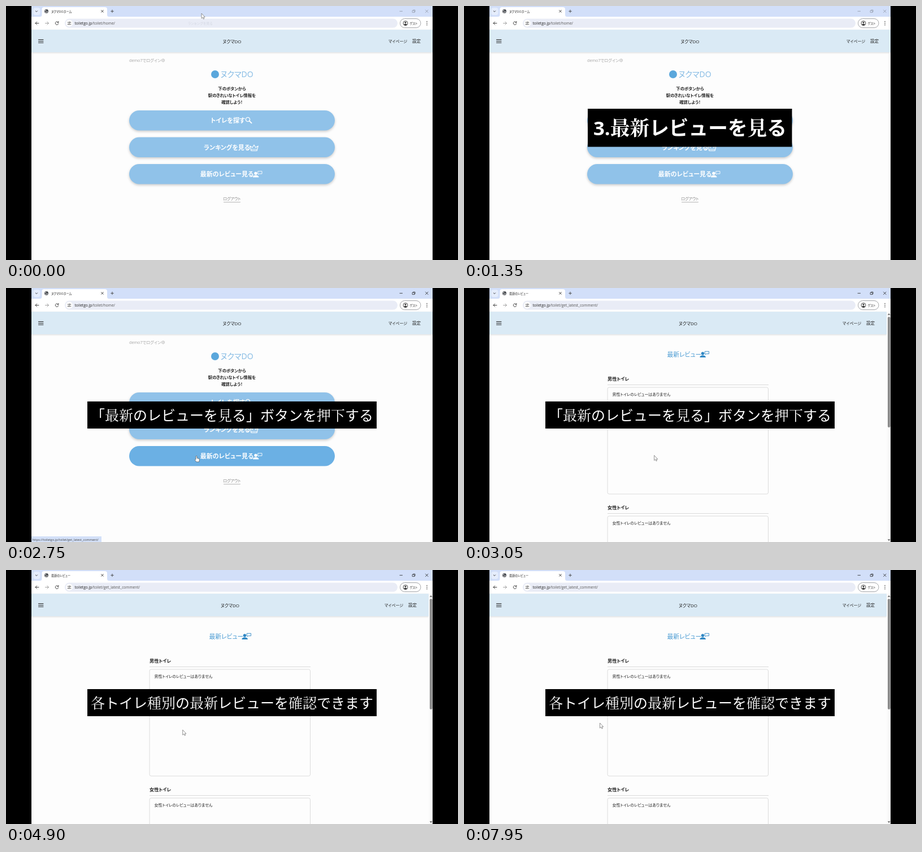
An HTML page for the animation above (8 s loop, 800 px wide and 450 px high).

```html
<!DOCTYPE html>
<html lang="ja">
<head>
<meta charset="utf-8">
<title>操作ガイド</title>
<style>
  html, body { margin: 0; width: 100%; height: 100%; overflow: hidden; background: #000; }
  svg { display: block; width: 100%; height: 100%; }
  text { font-family: "Open Sans", "Noto Sans CJK JP", "Noto Sans CJK", sans-serif; font-feature-settings: "palt"; white-space: pre; }
  .caption text { font-family: "Noto Sans", "Noto Sans CJK JP", "Noto Sans CJK", sans-serif; font-feature-settings: normal; fill: #fff; }
  .kanji { font-family: "Noto Serif CJK JP", "Noto Sans CJK JP", "Noto Sans CJK", serif; }
  .line { fill: none; stroke-linecap: round; stroke-linejoin: round; }
  .button rect { fill: #90c2e9; filter: drop-shadow(0 2px 2px #0003); }
  .button.hover rect { fill: #6bb0e4; filter: none; }
</style>
</head>
<body>
<svg id="stage" viewBox="0 0 800 450"></svg>
<script>
const LOOP = 8000;
const CAPTION1 = 50, CAPTION2 = 2000, CAPTION3 = 4250;
const STATUS_AT = 1950, FOCUS_AT = 2750, NAVIGATE_AT = 3000;

// Pointer tip: [time, x, y]
const POINTER = [
  [0, 346, 13], [100, 346, 13], [850, 349, 190], [1350, 345, 226],
  [1650, 335.5, 296], [2400, 336, 296], [2750, 337, 297], [3000, 337, 297],
  [3400, 329, 286], [4600, 329, 286], [5700, 240.5, 271], [LOOP, 240.5, 271]
];
const BUTTONS = [
  { y: 185, label: '便', x: 392.5 }, { y: 232.5, x: 391 }, { y: 280, x: 391 }
];
['トイレを探す', 'ランキングを見る', '最新のレビュー見る'].forEach((s, i) => BUTTONS[i].label = s);

const rect = (x, y, w, h, fill, attrs = '') =>
  `<rect x="${x}" y="${y}" width="${w}" height="${h}" fill="${fill}" ${attrs}/>`;
const circle = (x, y, r, fill, attrs = '') =>
  `<circle cx="${x}" cy="${y}" r="${r}" fill="${fill}" ${attrs}/>`;
const line = (d, color, width = 1) =>
  `<path class="line" d="${d}" stroke="${color}" stroke-width="${width}"/>`;
const text = (x, y, size, content, fill = '#222', attrs = '') =>
  `<text x="${x}" y="${y}" font-size="${size}" fill="${fill}" ${attrs}>${content}</text>`;
const centered = (x, y, size, content, fill, attrs = '') =>
  text(x, y, size, content, fill, `text-anchor="middle" ${attrs}`);
const group = (id, content, attrs = '') => `<g id="${id}" ${attrs}>${content}</g>`;
const bold = 'font-weight="700"', medium = 'font-weight="500"';

const reviewer = (x, y, color) => `<g transform="translate(${x} ${y})">
  ${circle(5, 4.5, 2.7, color)}
  <path d="M0 11.5V10.5Q1 7.7 5 7.7T10.3 10.5V11.5Z" fill="${color}"/>
  ${line('M9.2 .8H16V5.2H11.3L9.8 6.5V5.2H9.2Z', color, .9)}</g>`;

const icons = [
  line('M430.8 203.6L434.5 207.4', '#fff', 2) + circle(428, 201, 3.6, 'none', 'stroke="#fff" stroke-width="1.4"'),
  line('M434 256.5H444L446.3 248 441.8 250.8 439 246 436.2 250.8 431.7 248ZM434.5 254H443.5', '#fff', 1.1),
  reviewer(437, 292, '#fff')
];

const address = path => text(121.5, 33, 6.6,
  `toiletgo.jp<tspan fill="#555">${path}</tspan>`, '#222');

function browserFrame() {
  return rect(45, 0, 710, 450, '#fdfdfd') +
    rect(45, 0, 710, 19, '#d2dff9') +
    rect(48, 3, 12.5, 13, '#e5edfc', 'rx="4"') +
    line('M52.3 8.7L54 10.4 55.7 8.7', '#333', .9) +
    '<path d="M60 19Q63.500 19 63.500 15.500V6Q63.500 2 67.500 2H175Q179 2 179 6V15.500Q179 19 182.500 19Z" fill="#fff"/>' +
    circle(71.5, 9.3, 3.5, '#4a4d52') +
    line('M69 8.300Q70.500 8.500 71 7.200M71.500 10.500Q73.500 9.500 74 10.500M69.500 10.500L70.500 11.500', '#fff', .9) +
    line('M168.700 7.500L172.300 11.100M172.300 7.500L168.700 11.100', '#222', .9) +
    line('M185.700 9.300H190.300M188 7V11.600', '#444', .9) +
    group('windowButtons',
      line('M697 9.300H701.500', 'currentColor', .8) +
      line('M719.500 8H723V11.500H719.500ZM720.600 8V7H724V10.400H723', 'currentColor', .7) +
      line('M742.500 7L747 11.500M747 7L742.500 11.500', 'currentColor', .8)) +
    rect(45, 19, 710, 23, '#fff') +
    line('M58 30.500H52M54.700 27.800L52 30.500 54.700 33.200', '#444', 1) +
    line('M69.500 30.500H75.500M72.800 27.800L75.500 30.500 72.800 33.200', '#9a9a9a', .9) +
    line('M92.500 29A2.800 2.800 0 1 0 92.800 31.300M92.900 27.300V29.300H90.900', '#444', 1) +
    rect(104, 22.5, 589, 16, '#e9ecf6', 'rx="8"') +
    circle(112, 30.5, 6, '#fff') +
    line('M109 29H111M114 29H115M109 32.300H110M113 32.300H115', '#444', .8) +
    circle(112.5, 29, 1, 'none', 'stroke="#444" stroke-width=".8"') +
    circle(111.5, 32.3, 1, 'none', 'stroke="#444" stroke-width=".8"') +
    rect(697.5, 22.5, 36.5, 16, '#fff', 'rx="8" stroke="#8b8d92" stroke-width=".8"') +
    circle(707, 30.5, 4, 'none', 'stroke="#333" stroke-width=".9"') +
    circle(707, 29.3, 1.4, '#333') +
    '<path d="M704.200 33Q707 30.200 709.800 33Q707 35.500 704.200 33Z" fill="#333"/>' +
    text(714.5, 32.7, 5.3, 'ゲスト', '#333') +
    [27.5, 30.5, 33.5].map(y => circle(745, y, .8, '#333')).join('');
}

function siteHeader(right) {
  const shift = right - 755;
  return rect(45, 42, right - 45, 40, '#daeaf5', 'style="filter:drop-shadow(0 1px 1.5px #0002)"') +
    line('M57.500 59.500H66M57.500 62.300H66M57.500 65.100H66', '#222', 1) +
    centered(400 + shift / 2, 65.7, 8, 'ヌクマDO') +
    text(677 + shift, 65, 7, 'マイページ') +
    text(719 + shift, 65, 7.5, '設定');
}

function homePage() {
  const intro = ['下のボタンから', '駅のきれいなトイレ情報を', '確認しよう！'];
  return text(80, 11.5, 5.2, 'ヌクマDOホーム') + address('/toilet/home/') + siteHeader(755) +
    text(218, 99, 7.2, 'demo7でログイン中', '#a4a4a4') +
    circle(370, 121, 7, '#5aa7dc') +
    text(379.5, 126.3, 14, 'ヌクマDO', '#85bbe4', medium) +
    intro.map((s, i) => centered(400, 148.5 + 12 * i, 7.4, s, '#222', bold)).join('') +
    BUTTONS.map((b, i) => `<g class="button">${rect(218, b.y, 364, 35.5, '', 'rx="17.75"')}` +
      centered(b.x, b.y + 22, 11, b.label, '#fff', bold) + icons[i] + '</g>').join('') +
    centered(400, 344, 7, 'ログアウト', '#888') + line('M385.500 347.500H414.500', '#999', .7);
}

function reviewSection(y, kind) {
  return text(254, y + 4, 8.2, kind, '#222', bold) +
    rect(254, y + 11, 285, .8, '#d2d2d2') +
    rect(254, y + 16, 284.5, 189, '#fdfdfd', 'rx="3" stroke="#d8d8d8" stroke-width=".9"') +
    text(262.5, y + 30.8, 7, kind + 'のレビューはありません');
}

function reviewPage() {
  return text(80, 11.5, 5.2, '最新のレビュー') + address('/toilet/get_latest_comment/') + siteHeader(748) +
    text(359.5, 122, 10.8, '最新レビュー', '#4a9bd3', medium) + reviewer(417.5, 111.5, '#2f87c4') +
    reviewSection(160, '男性トイレ') + reviewSection(388, '女性トイレ') +
    rect(748, 42, 7, 408, '#fafafa') + rect(750, 51, 4.5, 196, '#8b8b8b', 'rx="2.2"') +
    '<path d="M749.800 48L752.200 44.500 754.600 48ZM749.800 445L752.200 448.500 754.600 445Z" fill="#777"/>';
}

function caption(id, x, y, w, h, size, content, weight) {
  const mixed = content.replace(/[\u4e00-\u9fff]+/g, '<tspan class="kanji">$&</tspan>');
  return group(id, rect(x, y, w, h, '#000') +
    centered(400, y + h / 2 + size * .38, size, mixed, '#fff', `font-weight="${weight}"`), 'class="caption"');
}

const stage = document.getElementById('stage');
stage.innerHTML = rect(0, 0, 800, 450, '#000') + browserFrame() +
  group('home', homePage()) + group('reviews', reviewPage()) +
  group('residue', text(322, 32.7, 6, 'ランキングを見る', '#d3d7e2')) +
  group('status', rect(45, 440, 124, 10, '#d3e0f8') +
    text(46.5, 447.5, 5.6, 'https://toiletgo.jp/toilet/get_latest_comment/', '#444')) +
  group('pointer',
    group('arrow', '<path d="M0 0V9L2.100 7.200 3.500 10.200 4.900 9.500 3.600 6.700H6.200Z" fill="#fff" stroke="#777" stroke-width=".8"/>') +
    group('hand', '<path d="M-1 1Q0 -.5 1 1V4.500L4 5.200Q5.500 5.500 5.300 7L4.800 11H-.2L-2.700 7.500Q-2.500 6-1 7Z" fill="#fff" stroke="#555" stroke-width=".7"/>')) +
  caption('caption1', 219, 182, 361.5, 67.5, 34.7, '3.最新レビューを見る', 700) +
  caption('caption2', 144, 201, 512, 48, 25, '「最新のレビューを見る」ボタンを押下する', 500) +
  caption('caption3', 144, 211, 512, 48, 25, '各トイレ種別の最新レビューを確認できます', 500);

const byId = id => document.getElementById(id);
const show = (id, visible) => byId(id).setAttribute('display', visible ? 'inline' : 'none');
const buttonNodes = document.querySelectorAll('.button');

function pointerAt(t) {
  const i = POINTER.findIndex(key => key[0] > t);
  const [t0, x0, y0] = POINTER[i - 1], [t1, x1, y1] = POINTER[i];
  const p = (t - t0) / (t1 - t0), eased = p * p * (3 - 2 * p);
  return [x0 + (x1 - x0) * eased, y0 + (y1 - y0) * eased];
}

function render(t) {
  const onHome = t < NAVIGATE_AT;
  const [x, y] = pointerAt(t);
  let hovering = false;
  BUTTONS.forEach((b, i) => {
    const over = onHome && y >= b.y && y <= b.y + 35.5;
    buttonNodes[i].classList.toggle('hover', over);
    hovering = hovering || over;
  });
  show('home', onHome);
  show('reviews', !onHome);
  show('residue', t < CAPTION1);
  show('status', onHome && t >= STATUS_AT);
  show('arrow', !hovering);
  show('hand', hovering);
  show('caption1', t >= CAPTION1 && t < CAPTION2);
  show('caption2', t >= CAPTION2 && t < CAPTION3);
  show('caption3', t >= CAPTION3);
  byId('windowButtons').setAttribute('color', t < FOCUS_AT ? '#8f96a5' : '#222');
  byId('pointer').setAttribute('transform', `translate(${x} ${y})`);
}

const start = performance.now();
function tick() {
  render((performance.now() - start) % LOOP);
  requestAnimationFrame(tick);
}
tick();
</script>
</body>
</html>
```
